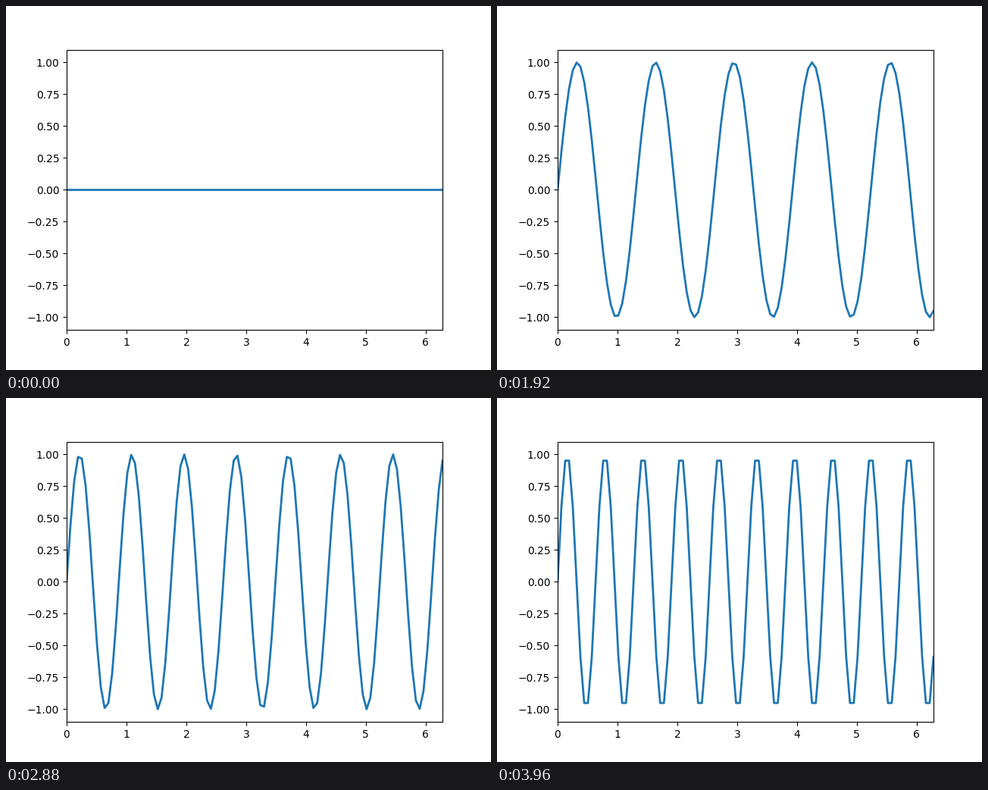
Write a matplotlib script that moves like this. It is 640x480 px and loops after 4000 ms.

```python
import numpy as np
import matplotlib.pyplot as plt
from matplotlib.animation import FuncAnimation

FRAMES = 100
INTERVAL = 40  # ms

fig, ax = plt.subplots(figsize=(6.4, 4.8), dpi=100)
ax.set_xlim(0, 2 * np.pi)
ax.set_ylim(-1.1, 1.1)

x = np.linspace(0, 2 * np.pi, 100)
line, = ax.plot(x, np.zeros_like(x), color="#1f77b4", lw=2)


def update(i):
    # The frequency grows by 0.1 per frame.
    line.set_ydata(np.sin(0.1 * i * x))
    return line,


anim = FuncAnimation(fig, update, frames=FRAMES, interval=INTERVAL,
                     init_func=lambda: update(0), repeat=True,
                     repeat_delay=0, blit=False)
plt.show()
```
